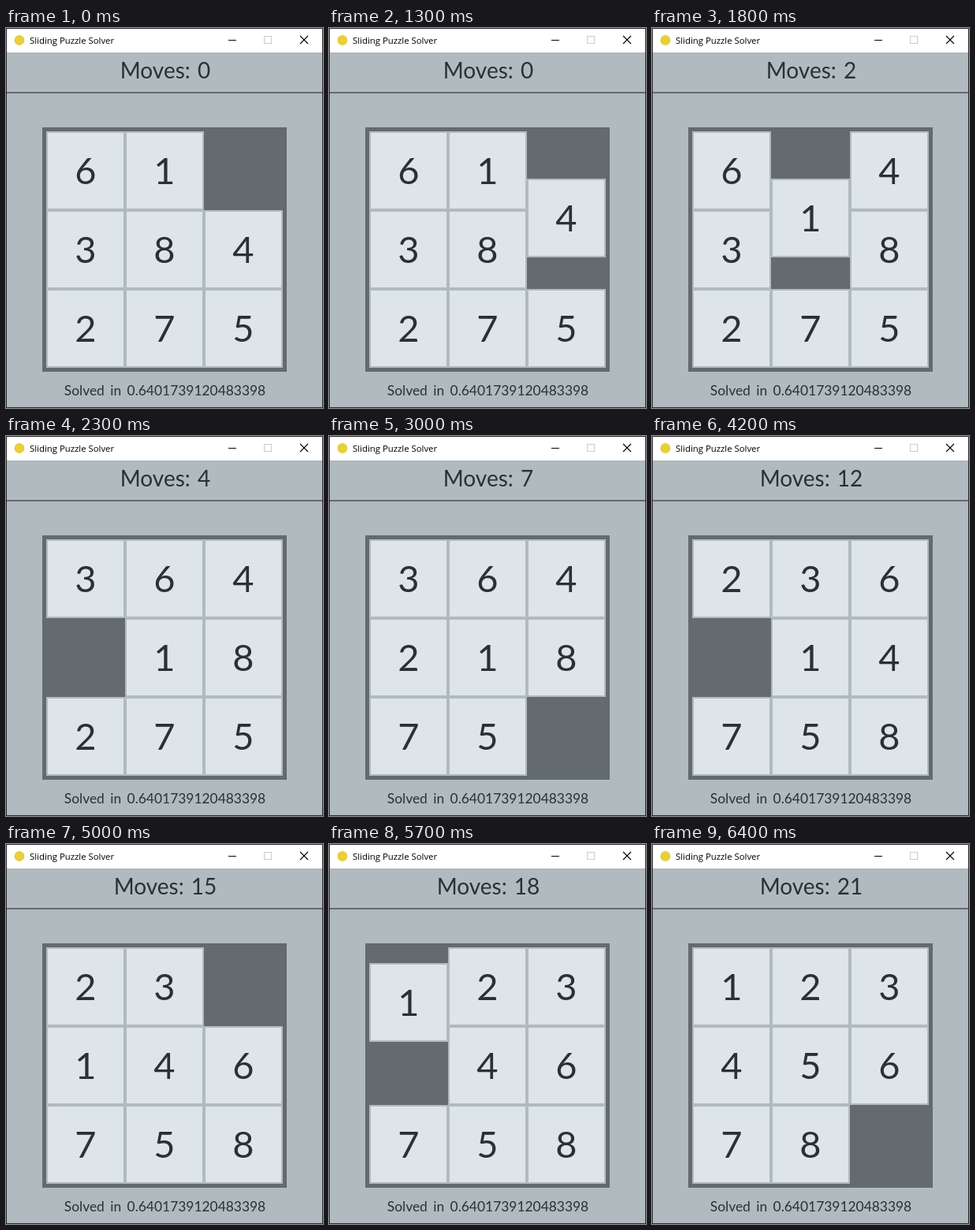
An HTML page for the animation above (8.3 s loop, 402 by 482 pixels).

```html
<!DOCTYPE html>
<html lang="en">
<head>
<meta charset="utf-8">
<title>Sliding Puzzle Solver</title>
<style>
  html, body { margin: 0; width: 100%; height: 100%; overflow: hidden; }
  svg { display: block; width: 402px; height: 482px; }
  text { font-family: Lato, "Open Sans", sans-serif; fill: #293136; }
  .mid { text-anchor: middle; }
  .title { font: 11.35px "Open Sans", "Noto Sans", sans-serif; fill: #000; }
  .moves { font-size: 28px; word-spacing: 2px; }
  .solved { font-size: 17.4px; word-spacing: 3px; }
  .digit { font-size: 47px; }
</style>
</head>
<body>
<svg viewBox="0 0 402 482">
  <rect width="402" height="482" fill="#2b2b2b"/>
  <rect x="1" y="1" width="400" height="30" fill="#fff"/>
  <circle cx="17" cy="15.5" r="6.5" fill="#e8cf3c"/>
  <text class="title" x="30" y="20">Sliding Puzzle Solver</text>
  <g fill="none" shape-rendering="crispEdges">
    <path d="M282 15.5h10" stroke="#000"/>
    <rect x="327.5" y="10.5" width="9" height="9" stroke="#ccc"/>
  </g>
  <path d="M373 10l10 10M383 10l-10 10" stroke="#000" stroke-width="1.1"/>

  <rect x="1" y="31" width="400" height="450" fill="#b0babf"/>
  <rect x="1" y="81" width="400" height="2" fill="#636a70"/>
  <text id="moves" class="mid moves" x="202" y="64"></text>
  <rect x="46" y="126" width="310" height="310" fill="#636a70"/>
  <g id="board"></g>
  <text class="mid solved" x="201.5" y="466">Solved in 0.6401739120483398</text>
</svg>
<script>
const LOOP = 8300, SAMPLE = 100;
const CELL = 100, STEP = 20, LEFT = 51, TOP = 131;
const MOVE_TICKS = 7; // five sliding steps, then a short rest
const START = [6, 1, 0, 3, 8, 4, 2, 7, 5];
const SOLUTION = [4, 8, 1, 6, 3, 2, 7, 5, 8, 4, 6, 3, 2, 1, 4, 6, 3, 2, 1, 4, 5, 8];

// [time in ms, solver ticks]
const PACE = [
  [1200, 0], [1300, 2.5], [1600, 12.5], [1700, 13.7], [2300, 33.5],
  [3000, 54.5], [3299, 54.5], [3300, 63.5], [4200, 90.5], [5700, 130.5], [6400, 152.5]
];

const SVG = "http://www.w3.org/2000/svg";
const board = document.getElementById("board");
const counter = document.getElementById("moves");

function add(parent, name, attrs) {
  const el = document.createElementNS(SVG, name);
  for (const key in attrs) el.setAttribute(key, attrs[key]);
  return parent.appendChild(el);
}

function makeTile(number) {
  const tile = add(board, "g", {});
  add(tile, "rect", { width: CELL, height: CELL, fill: "#b0babf" });
  add(tile, "rect", { x: 2, y: 2, width: CELL - 4, height: CELL - 4, fill: "#dde5e8" });
  add(tile, "text", { class: "mid digit", x: 50, y: 66.5 }).textContent = number;
  return tile;
}

const tiles = [null];
for (let n = 1; n <= 8; n++) tiles.push(makeTile(n));

function ticksAt(time) {
  const next = PACE.findIndex(p => time < p[0]);
  if (next === 0) return 0;
  if (next < 0) return PACE[PACE.length - 1][1];
  const [t0, n0] = PACE[next - 1], [t1, n1] = PACE[next];
  return n0 + (n1 - n0) * (time - t0) / (t1 - t0);
}

const cellX = i => LEFT + i % 3 * CELL;
const cellY = i => TOP + Math.floor(i / 3) * CELL;

function place(number, x, y) {
  tiles[number].setAttribute("transform", `translate(${x} ${y})`);
}

function draw(time) {
  const ticks = Math.floor(ticksAt(Math.floor(time / SAMPLE) * SAMPLE));
  const current = Math.min(SOLUTION.length - 1, Math.floor(ticks / MOVE_TICKS));
  const shift = Math.min(CELL, (ticks - current * MOVE_TICKS) * STEP);

  const grid = START.slice();
  for (const number of SOLUTION.slice(0, current)) {
    const from = grid.indexOf(number);
    grid[grid.indexOf(0)] = number;
    grid[from] = 0;
  }
  grid.forEach((number, i) => { if (number) place(number, cellX(i), cellY(i)); });

  const from = grid.indexOf(SOLUTION[current]), to = grid.indexOf(0);
  place(SOLUTION[current],
    cellX(from) + Math.sign(cellX(to) - cellX(from)) * shift,
    cellY(from) + Math.sign(cellY(to) - cellY(from)) * shift);
  counter.textContent = "Moves: " + current;
}

function frame() {
  draw(performance.now() % LOOP);
  requestAnimationFrame(frame);
}
frame();
</script>
</body>
</html>
```
